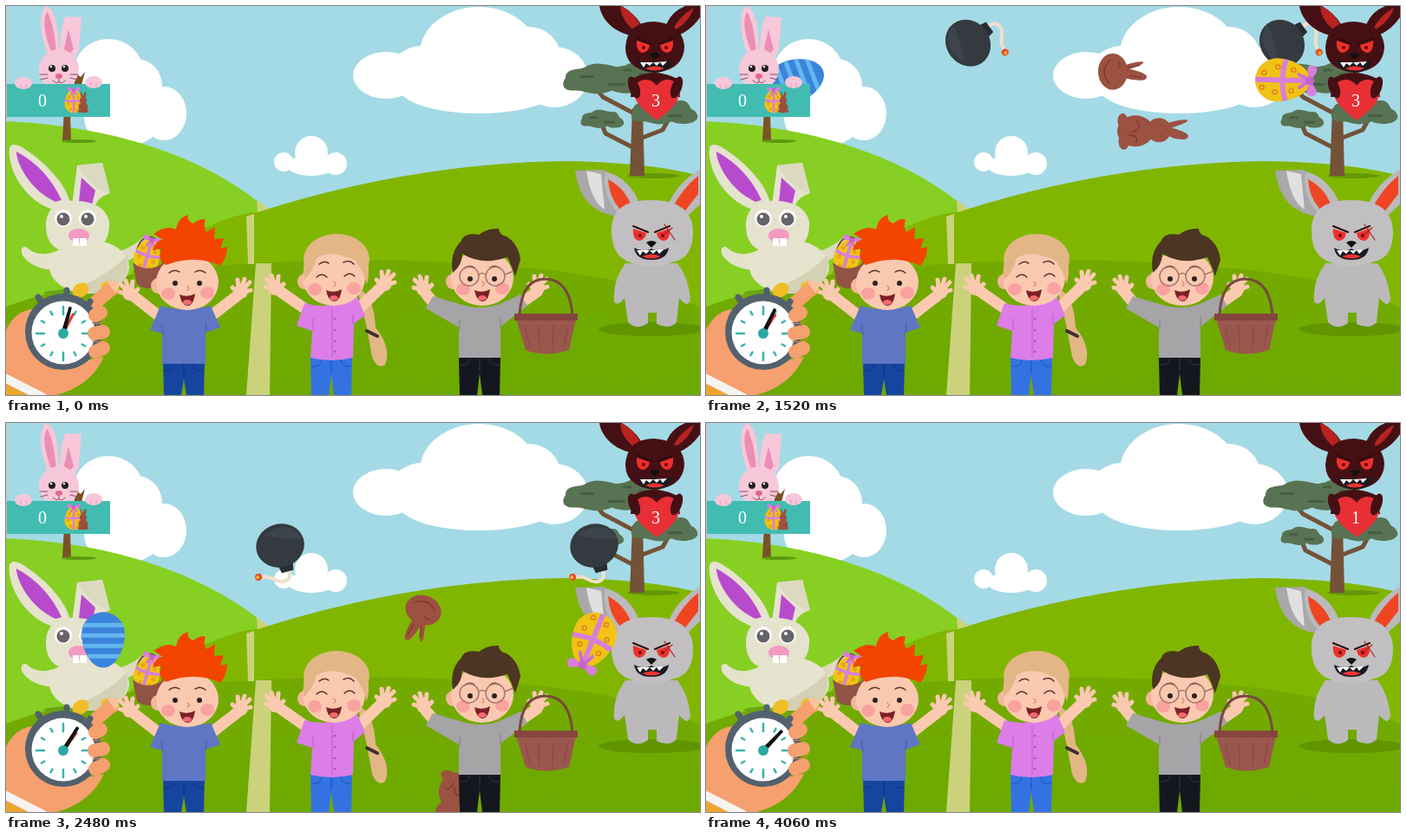
Animation of 800x449 px, one loop 4.09 s. Source, as an HTML page:

```html
<!DOCTYPE html>
<html lang="en">
<head>
<meta charset="utf-8">
<title>Egg catching game</title>
<style>
html,body{margin:0;width:100%;height:100%;overflow:hidden;background:#a4dae5}
svg{display:block;width:100vw;height:100vh}
text{font-family:"Liberation Serif",serif;font-size:20px;fill:#fff;text-anchor:middle}
</style>
</head>
<body>
<svg id="stage" viewBox="0 0 800 449" preserveAspectRatio="none"></svg>
<script>
const LOOP = 4090, HIT = 3820;
const SKIN = '#fbc9b0', CHOCO = '#9c5141';

const path = (d, fill, extra = '') => `<path d="${d}" fill="${fill}" ${extra}/>`;
const line = (d, color, width = 1, extra = '') =>
  `<path d="${d}" fill="none" stroke="${color}" stroke-width="${width}" stroke-linecap="round" stroke-linejoin="round" ${extra}/>`;
const oval = (x, y, rx, ry, fill, turn = 0) =>
  `<ellipse cx="${x}" cy="${y}" rx="${rx}" ry="${ry}" fill="${fill}" transform="rotate(${turn} ${x} ${y})"/>`;
const dot = (x, y, r, fill) => oval(x, y, r, r, fill);
const group = (body, transform = '', extra = '') => `<g transform="${transform}" ${extra}>${body}</g>`;
const ovals = (fill, list) => list.map(([x, y, rx, ry]) => oval(x, y, rx, ry, fill)).join('');

const EGG = 'M0-32C15-32 25-10 25 7A25 25 0 0 1-25 7C-25-10-15-32 0-32Z';
const blueEgg = path(EGG, '#3c83dc') + group(
  [-19, -7, 5, 17].map(y => line(`M-28 ${y}H28`, '#63b7f0', 5)).join(''), '', 'clip-path="url(#egg)"');
const yellowEgg = path(EGG, '#f0c316') +
  [[-12, -12], [12, -10], [-15, 6], [14, 9], [-8, 22], [9, 24], [-3, -24]].map(([x, y]) =>
    dot(x, y, 3.4, '#e58e13') + dot(x, y, 1.2, '#f7d54e')).join('') +
  group(line('M0-32V32M-27-4Q0 5 27-4', '#d77fd9', 6), '', 'clip-path="url(#egg)"') +
  path('M0-31Q-16-46-18-33Q-18-24 0-31Q16-46 18-33Q18-24 0-31', '#d77fd9') +
  line('M-1-30L-7-18M1-30L8-19', '#cf6fd1', 4) + dot(0, -31, 5, '#c861c9');
const bomb = group(
  line('M30-1C43-4 44 10 35 18Q29 24 29 32', '#f1dfcd', 4) +
  dot(28, 34, 4, '#e9491f') + dot(28, 35, 2, '#ffb23c') +
  path('M20-9L31-7V7L20 9Z', '#272c31') + oval(0, 0, 25, 28, '#343a40') +
  path('M-16-17Q-24-4-17 15Q-8 2-1-26Q-10-25-16-17Z', '#424850', 'opacity=".7"'), 'translate(-6 -7)');
const chocoHead = path('M-7-4C-15-30-10-35-3-10Q4-38 10-27Q11-14 7-2Z', CHOCO) +
  oval(0, 9, 21, 17, CHOCO) + line('M-13 12Q-2 25 13 14M-11 2Q-7-1-4 3', '#7c392f', 1.3) +
  line('M-7-22L-4-9M7-24L5-10', '#7c392f', 1.3);
const chocoSit = path('M-7-18C-14-46-10-55-2-25Q7-52 12-40Q13-28 5-17Z', CHOCO) +
  oval(0, -10, 14, 14, CHOCO) + oval(0, 17, 18, 21, CHOCO) + oval(-12, 31, 9, 6, CHOCO) + oval(12, 31, 9, 6, CHOCO) +
  line('M-12 15Q-3 8 1 20M13 17Q5 13 4 25M-6-12h1M6-12h1', '#7c392f', 1.4);

function hill() {
  return path('M0 133C130 139 235 177 303 236L260 449H0Z', '#87cf22') +
    path('M150 300Q245 240 290 238Q465 182 640 179Q740 180 800 196V449H60Z', '#80b600') +
    path('M0 347Q60 325 150 309Q390 280 620 304Q735 317 800 348V449H0Z', 'url(#grass)') +
    path('M289 224L303 234L290 238ZM277 243L286 240V298H279Z', '#cbd27b') +
    path('M288 297H306L304 449H277Z', '#cbd27b');
}
function clouds() {
  return ovals('#fff', [[545, 55, 68, 54], [438, 80, 38, 27], [480, 78, 38, 32], [632, 82, 39, 35],
    [545, 94, 92, 30], [603, 59, 36, 35], [118, 78, 41, 40], [150, 92, 30, 31], [182, 124, 26, 31],
    [135, 130, 45, 32], [352, 169, 19, 19], [320, 180, 11, 11], [380, 182, 13, 13], [352, 184, 28, 12]]);
}
function trees() {
  const blob = (x, y, w, h) => group(
    path('M-1-.1C-1-.8-.6-.6-.5-.8C-.2-1.3.2-.8.4-.8C.8-.9.7-.2.9-.1C1.3.8.5 1.1.2.7C-.3 1.2-.5.6-.8.7C-1.1.7-1.1.2-1-.1Z', '#587353'),
    `translate(${x} ${y}) scale(${w} ${h})`) +
    line(`M${x - w * .6} ${y - h * .2}h${w * .3}M${x + w * .1} ${y + h * .3}h${w * .4}`, '#455d42', 3);
  return path('M65 156L67 120L78 100L80 77L86 82L91 76L85 99L74 124L75 157Z', '#7c5128') +
    oval(84, 156, 20, 2, '#5f9910') + oval(746, 196, 30, 3, '#629807') +
    path('M719 196L722 118H734L736 196Z', '#735239') +
    line('M726 165L691 147L687 137M726 125L688 105L681 96M731 153L757 143L763 132', '#735239', 5) +
    blob(690, 85, 45, 18) + blob(688, 131, 24, 11) + blob(760, 122, 37, 16) + blob(728, 76, 26, 10);
}
function angryFace(x, y) {
  const eye = s => group(path('M6-11L21-16Q22-3 14-2Q7-3 6-11Z', '#ee302b') + line('M4-12L21-19', '#300b0b', 2) +
    dot(13, -8, 2, '#5c0505'), `scale(${s} 1)`);
  return group(eye(1) + eye(-1) + path('M-6 0Q0-4 6 0L0 6Z', '#111') +
    path('M-20 6Q-8 12 0 7Q8 12 20 6Q18 20 0 20Q-18 20-20 6Z', '#1a1a22') +
    path('M-11 16Q0 11 11 16Q0 21-11 16Z', '#ef3434') +
    path('M-17 9l4 6l3-5l4 3l4-4l4 4l4-4l3 4l5-5l-14 1Z', '#fff'), `translate(${x} ${y})`);
}
function whiteBunny() {
  const eye = x => dot(x, 245, 10, '#fff') + dot(x, 246, 7.5, '#656569') + dot(x - 2, 243, 2, '#fff');
  return oval(88, 331, 45, 4, '#69a514') +
    path('M60 282Q38 292 23 278Q15 277 19 288Q33 307 64 304Z', '#e5e2cb') +
    path('M120 285Q144 282 161 264L168 268Q157 291 123 301Z', '#dedabf') +
    oval(96, 301, 46, 31, '#e6e3ce') + path('M73 329Q119 311 139 288Q145 312 126 326Q106 335 73 329Z', '#d5d1b4') +
    path('M61 237C23 229 1 189 4 164Q7 156 20 164C50 183 72 211 74 229Z', '#e5e2ce') +
    path('M57 226C28 213 12 182 12 168Q47 187 64 224Z', '#b84bcd') +
    path('M76 230L82 184L111 181L120 216Q104 221 102 234Z', '#e5e2ce') +
    path('M84 226L87 198L103 213L99 230Z', '#b84bcd') + path('M82 184L111 181L120 216Q99 212 82 184Z', '#dcd9c1') +
    path('M46 252C47 230 64 223 83 225Q114 227 119 249Q121 283 84 286Q45 286 46 252Z', '#e5e2ce') +
    eye(66) + eye(94) + oval(84, 265, 12, 8, '#f39ac1') + path('M77 268h7v9h-7zM85 268h8v9h-8z', '#fff') +
    oval(86, 328, 10, 8, '#efbd25', -35) + oval(120, 326, 11, 8, '#efbd25', 20) +
    line('M149 295Q151 264 169 267Q182 275 181 297', '#73493a', 2) +
    group(yellowEgg, 'translate(163 288) rotate(16) scale(.6)') +
    path('M146 296Q163 310 182 296L179 321Q164 331 151 321Z', '#915344');
}
function greyBunny() {
  return oval(744, 373, 61, 8, '#609500') +
    path('M656 190L690 189L722 231L706 243Q662 238 656 190Z', '#a9a8aa') +
    path('M669 190L686 194L690 235Q674 225 669 190Z', '#e1e0e1') +
    path('M691 191Q719 198 731 230L707 241Q686 219 691 191Z', '#bbb9bb') +
    path('M694 200Q715 211 722 234L708 235Q695 220 694 200Z', '#ef4523') +
    path('M763 231Q772 205 801 188V228L784 244Z', '#bbb9bb') +
    path('M767 235Q780 210 798 196V217L780 240Z', '#ef4523') +
    path('M714 297Q699 317 701 341Q705 348 713 337L717 365Q727 375 740 366V354H750V367Q765 374 773 365L776 337Q787 351 789 337Q786 312 774 297Z', '#bbb9bb') +
    path('M698 260Q697 224 743 224Q791 224 792 260Q792 291 770 295Q744 306 720 296Q698 289 698 260Z', '#c1bfc1') +
    angryFace(744, 273) + line('M759 252L771 270M757 265L768 256', '#a72420', 1.2);
}
function score() {
  const eye = x => dot(x, 72, 4, '#241f23') + dot(x - 1, 70, 1.3, '#fff');
  return path('M52 65C39 38 36 7 47 0Q61 5 61 57Z', '#f7c8d9') + path('M53 55C43 31 42 12 48 7Q56 24 58 55Z', '#ec8eb3') +
    path('M62 58Q62 23 69 12L87 13L84 51L75 66Z', '#f7c8d9') + path('M67 49L72 27L78 50L72 57Z', '#ec8eb3') +
    dot(61, 73, 23, '#f7c8d9') + eye(53) + eye(68) + oval(61, 81, 4, 3, '#e46595') +
    line('M61 84v4M54 86Q60 91 61 87Q64 91 68 86M39 79h9M40 85l8-2M83 79h-9M82 85l-8-2', '#835265', 1) +
    path('M0 90H120V128H0Z', '#42bcb1') + oval(20, 89, 10, 7, '#f7c8d9') + oval(101, 88, 10, 7, '#f7c8d9') +
    line('M17 90v5M23 90v5M98 89v5M104 89v5', '#dba3ba', 1) + line('M.5 0V134', '#d6b9c0', 1) +
    group(yellowEgg, 'translate(78 110) scale(.42)') + group(chocoSit, 'translate(89 112) scale(.3)') +
    '<text x="42" y="116">0</text>';
}
function lives() {
  const dark = '#451014';
  return path('M727 35C704 33 687 18 684 0H710Q729 11 738 32Z', dark) + path('M728 31Q709 18 708 0Q724 6 733 26Z', '#b72420') +
    path('M759 30Q762 9 783 0H800V13Q788 31 766 37Z', dark) + path('M768 29Q775 12 793 2Q787 20 768 29Z', '#b72420') +
    path('M722 84Q746 70 774 84L777 105H720Z', dark) +
    path('M714 48Q716 18 747 18Q780 20 782 47Q781 74 747 77Q714 73 714 48Z', dark) + angryFace(748, 56) +
    path('M750 132C733 119 724 111 724 99C724 84 742 80 750 92C758 80 776 84 776 99C776 112 765 121 750 132Z', '#e72f35') +
    oval(724, 94, 6, 13, dark, -20) + oval(773, 94, 6, 13, dark, 20) + '<text id="lives" x="749" y="116">3</text>';
}
function hand(x, y, side) {
  return group(oval(0, 0, 8, 9, SKIN) +
    line('M-3-3L-10-10M-1-5L-4-14M3-5L4-13M-5 1L-11-1M5 1L10-4', SKIN, 5), `translate(${x} ${y}) scale(${side} 1)`);
}
function face(x, y, eyes) {
  const eye = s => dot(x + 14 * s, y + 1, 3, '#2d2222') + line(`M${x + s * 9} ${y - 12}q${s * 6}-4 ${s * 12} 1`, '#5a3528', 1.5);
  return oval(x - 34, y + 4, 8, 9, '#f5b59e') + oval(x, y, 36, 32, SKIN) +
    oval(x - 22, y + 13, 8, 7, '#f9a29f') + oval(x + 23, y + 12, 8, 7, '#f9a29f') +
    (eyes || eye(1) + eye(-1)) + line(`M${x} ${y + 4}q4 3 0 5`, '#d98d78', 1.5) +
    path(`M${x - 9} ${y + 14}Q${x} ${y + 18} ${x + 9} ${y + 13}Q${x + 7} ${y + 27} ${x} ${y + 27}Q${x - 7} ${y + 26} ${x - 9} ${y + 14}Z`, '#7d2026') +
    oval(x, y + 23, 5, 3, '#f16a70');
}
function legs(x, y, color, seam) {
  return path(`M${x - 24} ${y}H${x + 24}L${x + 23} 449H${x + 3}L${x} ${y + 20}L${x - 3} 449H${x - 23}Z`, color) +
    line(`M${x} ${y + 3}v14M${x - 22} ${y + 10}q9 2 11-7M${x + 22} ${y + 10}q-9 2-11-7`, seam, 1);
}
function redBoy() {
  return line('M174 356L146 334M240 355L267 334', SKIN, 13) + hand(142, 331, 1) + hand(271, 329, -1) +
    legs(205, 411, '#1645a0', '#0e2f77') +
    path('M178 346Q205 354 236 346L247 371L230 377V413H180V378L166 374Z', '#5e76c3') +
    line('M181 379L179 366M230 377L231 366', '#4860ad', 1.2) + face(209, 319) +
    path('M184 299Q173 290 180 280L169 282Q173 269 181 270L170 263Q185 252 196 258Q198 244 210 241Q208 248 216 251Q225 244 230 247Q227 255 231 261L241 255L240 269L251 268L247 280L255 278Q255 290 247 300Q219 286 184 299Z', '#f34400');
}
function blondGirl() {
  const shut = line('M358 313q6-6 12 0M390 312q6-6 12 0M361 298q6-5 11-1M389 296q7-4 12 2', '#58352a', 1.5);
  return path('M405 326Q424 332 426 371Q445 395 437 414Q428 420 422 405L416 372Z', '#e2b785') + line('M416 375L428 381', '#3d3030', 4) +
    line('M344 349L314 328M407 349L434 323', SKIN, 13) + hand(310, 325, 1) + hand(437, 320, -1) +
    legs(375, 406, '#3472e2', '#1d50b4') +
    path('M344 343Q374 352 404 334L414 357L401 367L400 406Q375 412 351 406L353 375L335 369Z', '#dc7de8') +
    line('M376 349V405M354 374V361M400 367V356', '#b960c5', 1) + [361, 374, 387, 399].map(y => dot(379, y, 1.3, '#a94eb8')).join('') +
    oval(381, 292, 38, 29, '#e2b785') + face(378, 314, shut) +
    path('M343 317Q340 278 364 267Q390 257 411 278Q422 298 416 321Q412 307 403 294Q375 280 358 291Q355 305 343 317Z', '#e2b785');
}
function darkBoy() {
  const glasses = '<g fill="none" stroke="#a5796b" stroke-width="1.5"><circle cx="534" cy="312" r="11"/><circle cx="564" cy="312" r="11"/><path d="M545 310q4-3 8 0M575 310l10-4"/></g>';
  return line('M499 350L484 332M586 348L612 330', SKIN, 13) + hand(481, 326, 1) + hand(613, 325, -1) +
    legs(546, 404, '#14171f', '#343846') +
    path('M523 344Q546 352 569 344L593 333L601 346L570 370V406H522V371L484 349L492 335Z', '#a5a4a6') +
    line('M523 373V362M570 370V359', '#868589', 1.2) + face(549, 314) + glasses +
    path('M515 308Q511 284 525 271Q528 261 545 264Q555 256 568 257Q568 264 577 266Q591 275 593 293L587 312Q583 300 578 290Q549 300 526 286Q526 299 515 308Z', '#4c3522') +
    line('M592 357Q594 315 622 315Q650 316 653 357', '#77493d', 3) +
    path('M588 361H657L649 397Q622 406 599 397Z', '#9a574d') + line('M598 369L604 394M614 368L615 397M631 368L630 397M648 368L643 394', '#874941', 1) +
    path('M586 355H659V363H586Z', '#85453e');
}
function stopwatch() {
  const ticks = Array.from({ length: 12 }, (_, i) =>
    line(`M66 ${i % 3 ? 349 : 347}V${i % 3 ? 353 : 356}`, '#39b3ad', 2.5, `transform="rotate(${i * 30} 66 378)"`)).join('');
  return path('M0 374Q11 351 32 350L52 378L78 412L113 405Q97 439 58 449H0Z', '#f5a06e') +
    line('M92 352L122 326', '#f5a06e', 16) + path('M117 319Q124 315 130 320Q132 326 126 331Z', '#fbc39d') +
    line('M0 430L43 452', '#f7f4f0', 10) + path('M0 437L25 449H0Z', '#eda52c') +
    line('M41 342L37 336M70 335V328M94 346L97 341', '#52616d', 7) +
    dot(66, 376, 44, '#52616d') + dot(66, 377, 36.5, '#fff') + ticks +
    '<g id="red">' + line('M66 378V353', '#e23c35', 3) + '</g><g id="black">' +
    path('M64 382L65 347H67L68 382Z', '#111', 'stroke="#111" stroke-width="1.5"') + '</g>' + dot(66, 378, 6, '#2ca9a4') +
    line('M103 357L109 354M102 378L112 376M103 399L112 395', '#f5a06e', 16) +
    line('M99 366Q107 368 115 364M99 387Q108 389 117 385', '#df8554', 1);
}

const items = [
  { art: bomb, x: 311, y: [-54, .038, 1.77e-5], turn: -136, end: HIT },
  { art: bomb, x: 673, y: [-54, .038, 1.77e-5], turn: -136, end: HIT },
  { art: chocoSit, x: 512, y: [-119, .089, 5.5e-5], turn: -12 },
  { art: chocoHead, x: 478, y: [-47, .035, 3e-5], turn: -10 },
  { art: blueEgg, x: 110, y: [-42, .03, 3.54e-5], turn: -30, swing: 5 },
  { art: yellowEgg, x: 673, y: [-42, .03, 3.54e-5], turn: -8, swing: 8 }
];

const stage = document.getElementById('stage');
stage.innerHTML = `<defs><clipPath id="egg"><path d="${EGG}"/></clipPath>
  <linearGradient id="grass" x2="0" y2="1"><stop stop-color="#74aa00"/><stop offset="1" stop-color="#6da900"/></linearGradient></defs>
  <path d="M0 0H800V449H0Z" fill="#a4dae5"/>` +
  clouds() + hill() + trees() + whiteBunny() + greyBunny() +
  items.map(item => group(item.art, '', 'class="item"')).join('') +
  redBoy() + blondGirl() + darkBoy() + score() + lives() + stopwatch();

const nodes = stage.querySelectorAll('.item');
const find = id => document.getElementById(id);
const livesText = find('lives'), redHand = find('red'), blackHand = find('black');
const curve = ([a, b, c], t) => a + b * t + c * t * t;

function draw() {
  const t = performance.now() % LOOP;
  const spin = curve([0, .035, 2e-5], t);
  items.forEach((item, i) => {
    const sway = (item.swing || 0) * Math.cos((spin - 95) * Math.PI / 180);
    nodes[i].setAttribute('transform',
      `translate(${item.x - sway} ${curve(item.y, t)}) rotate(${spin + item.turn})`);
    nodes[i].style.display = t < (item.end || LOOP) ? '' : 'none';
  });
  livesText.textContent = t < HIT ? 3 : 1;
  redHand.setAttribute('transform', `rotate(${27 + t * .004} 66 378)`);
  blackHand.setAttribute('transform', `rotate(${15 + t * .007} 66 378)`);
  requestAnimationFrame(draw);
}
draw();
</script>
</body>
</html>
```
